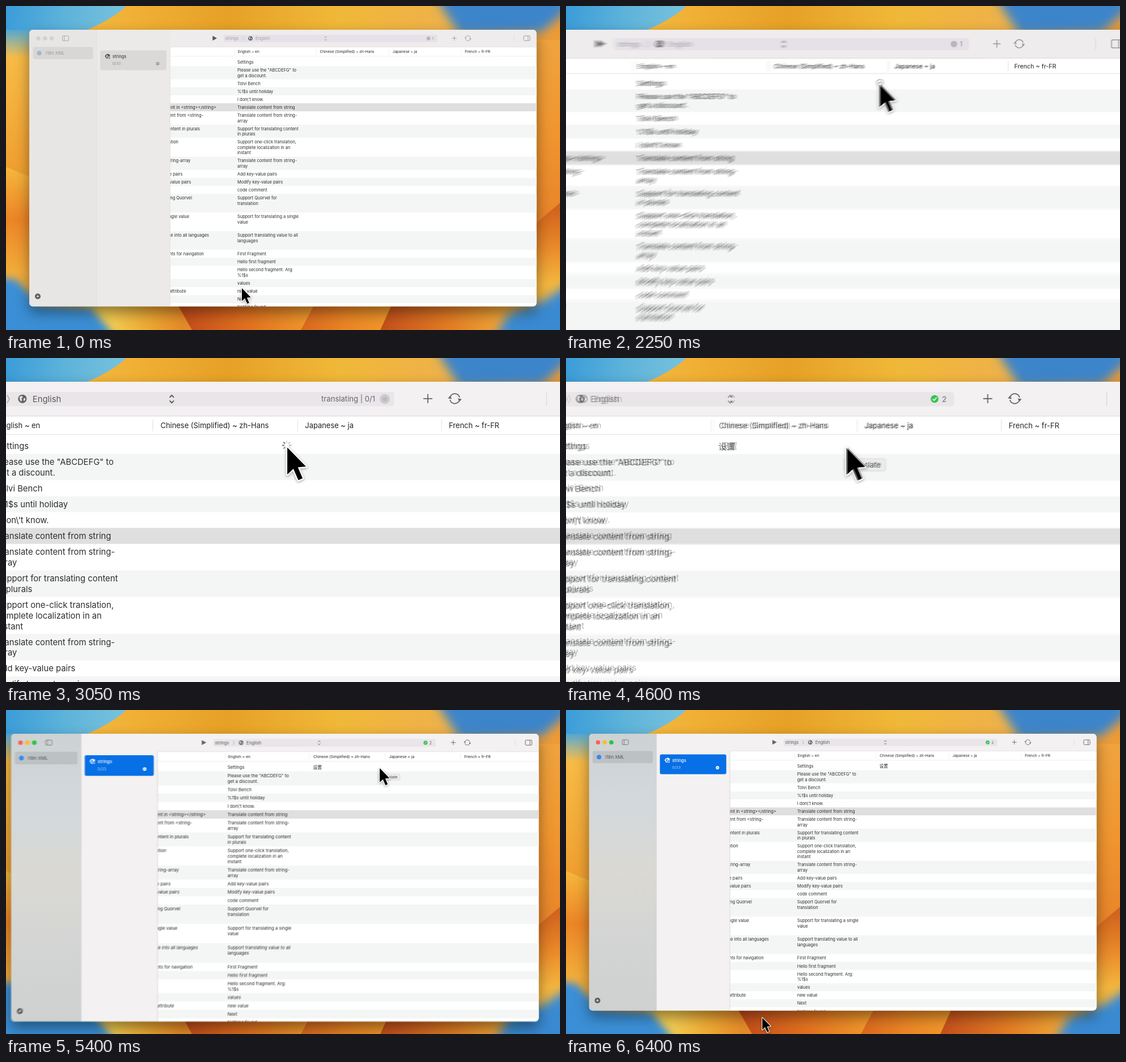
Recreate the animation shown at these times as an HTML page with a canvas. Size 977 px wide and 573 px high, loop 6450 ms.

```html
<!DOCTYPE html>
<html lang="en">
<head>
<meta charset="utf-8">
<title>Translating a string</title>
<style>
  html, body { margin: 0; width: 100%; height: 100%; overflow: hidden; }
  canvas { display: block; width: 977px; height: 573px; }
</style>
</head>
<body>
<canvas id="stage" width="977" height="573"></canvas>
<script>
const W = 977, H = 573, LOOP = 6450, STEP = 50;
const FOCUS = 2400, DONE = 3800;
const FONT = 'Inter, "Noto Sans CJK SC", "Noto Sans CJK", sans-serif';
const out = document.getElementById('stage').getContext('2d');

function layer() {
  const c = document.createElement('canvas');
  c.width = W; c.height = H;
  return c.getContext('2d');
}
const wall = layer(), scene = layer();
let g = wall;

// [value, key, right end of key, minimum lines]
const rows = [
  ['Settings'],
  ['Please use the "ABCDEFG" to\nget a discount.'],
  ['Tolvi Bench'],
  ['%1$s until holiday'],
  ["I don\\'t know."],
  ['Translate content from string', 'Translate content in <string></string>', 371],
  ['Translate content from string-\narray', 'Translate content from <string-', 348],
  ['Support for translating content\nin plurals', 'Translate content in plurals', 342],
  ['Support one-click translation,\ncomplete localization in an\ninstant', 'One-click translation', 304],
  ['Translate content from string-\narray', 'Translate string-array', 325.5],
  ['Add key-value pairs', 'Add key-value pairs', 311.5],
  ['Modify key-value pairs', 'Modify key-value pairs', 326.5],
  ['code comment'],
  ['Support Quorvel for\ntranslation', 'Translate using Quorvel', 328, 3],
  ['Support for translating a single\nvalue', 'Translate a single value', 323, 3],
  ['Support translating value to all\nlanguages', 'Translate value into all languages', 358, 3],
  ['First Fragment', 'Fragments for navigation', 349],
  ['Hello first fragment'],
  ['Hello second fragment. Arg:\n%1$s'],
  ['values'],
  ['new value', 'New attribute', 317.5],
  ['Next'],
  ['Nothing found']
];

function fade(x0, y0, x1, y1, ...stops) {
  const f = g.createLinearGradient(x0, y0, x1, y1);
  stops.forEach((c, i) => f.addColorStop(i / (stops.length - 1), c));
  return f;
}
function shape(fill, d, blur) {
  g.filter = blur ? `blur(${blur}px)` : 'none';
  g.fillStyle = fill;
  g.fill(new Path2D(d));
  g.filter = 'none';
}
function line(color, width, d) {
  g.strokeStyle = color;
  g.lineWidth = width;
  g.stroke(new Path2D(d));
}
function box(color, x, y, w, h, r = 0) {
  g.fillStyle = color;
  g.beginPath();
  g.roundRect(x, y, w, h, r);
  g.fill();
}
function disc(color, x, y, r) {
  g.fillStyle = color;
  g.beginPath();
  g.arc(x, y, r, 0, 7);
  g.fill();
}
function ring(color, x, y, r, width, a = 0, b = 6.2832) {
  g.strokeStyle = color;
  g.lineWidth = width;
  g.beginPath();
  g.arc(x, y, r, a, b);
  g.stroke();
}
function text(s, x, y, color = '#2d2d2d', size = 7.45, weight = 400, align = 'left') {
  g.font = `${weight} ${size}px ${FONT}`;
  g.textAlign = align;
  g.fillStyle = color;
  g.fillText(s, x, y + size * .36);
}

function paintWall() {
  g = wall;
  box(fade(0, 0, W, 0, '#f7bd45', '#f2b338', '#e6a126', '#f0b838', '#eeb14a', '#ee9a35'), 0, 0, W, H);
  shape(fade(0, 80, 0, 290, '#f8bc47', '#ef9f30'), 'M0 60H60V310L0 285Z');
  shape(fade(0, 285, 0, 470, '#f6b83c', '#ec8426', '#f2ac3a'), 'M0 285L60 311V540H0Z');
  shape(fade(0, 40, 0, 92, '#4aa5d9', 'rgba(98,178,218,0)'), 'M0 40H100V92H0Z');
  shape(fade(0, 0, 210, 20, '#3b9cd8', '#5db3da', '#79c2dc'), 'M0 0H212Q190 22 143 42H0Z');
  shape('#3c85ca', 'M748-30H1010L982 14L945 46L800 50Z', 9);
  shape(fade(0, 50, 0, 380, '#efa440', '#f0962f', '#e8842a'), 'M930 60H977V348L930 388Z');
  shape(fade(0, 360, 0, 490, '#d1641f', '#e98829', '#f4b63f'), 'M930 388L977 348V573H930Z');
  shape(fade(190, 0, 310, 0, '#f3ca50', '#eda934', '#e48a29'), 'M140 520H302L330 573H140Z');
  shape(fade(305, 0, 540, 0, '#c04a1a', '#e0701f', '#f09a2c'), 'M298 520L328 573H520L548 520Z');
  shape(fade(520, 0, 680, 0, '#d9681f', '#ea8525', '#f09a2a'), 'M548 520L520 573H660L684 520Z');
  shape(fade(665, 0, 900, 0, '#c4501b', '#e27d25', '#f3b03b'), 'M684 520L660 573H930V520Z');
  shape('#3b8fd6', 'M-30 478L18 484L60 528L150 534L205 600H-30Z', 7);
  shape('#3a8ad2', 'M1010 480L950 520L885 545L850 610H1010Z', 9);
}

// Remaining part of an overdamped spring
function rest(ms) {
  if (ms <= 0) return 1;
  const a = 4.19, b = 25, t = ms / 1000;
  return (b * Math.exp(-a * t) - a * Math.exp(-b * t)) / (b - a);
}
const zoomAt = t => t < 4590 ? 2 - rest(t - 1953) : 1 + rest(t - 4590);

// time, x, y, size
const path = [
  [820, 416, 499, .95], [1520, 661, 93, 1], [1700, 661, 96, 1],
  [2050, 666, 100.5, 1], [5430, 666, 100.5, 1], [6350, 346.5, 544, .88]
];
function cursorAt(t) {
  const i = path.findIndex(p => p[0] > t);
  if (i === 0) return path[0].slice(1);
  if (i < 0) return path[path.length - 1].slice(1);
  const a = path[i - 1], b = path[i];
  const u = (t - a[0]) / (b[0] - a[0]), e = u * u * (3 - 2 * u);
  return [1, 2, 3].map(k => a[k] + (b[k] - a[k]) * e);
}

function globe(x, y, color, land) {
  disc(color, x, y, 3.8);
  shape(land, `M${x - 2.6} ${y - 1.8}l2-1l1.2 1l-1.4 1.4l.6 1.4l-1 1.6l-1.2-2ZM${x + 1} ${y - .4}l1.8-.4l-.4 2l-1.4 1Z`);
}
function plus(x, y, r, color, width) {
  line(color, width, `M${x - r} ${y}h${2 * r}M${x} ${y - r}v${2 * r}`);
}
function panel(x, color, split) {
  g.strokeStyle = color;
  g.lineWidth = .9;
  g.beginPath();
  g.roundRect(x - 5.5, 52.8, 11, 8.6, 1.5);
  g.stroke();
  line(color, .9, `M${x + split} 53v8`);
}
function spinner(x, y, t) {
  for (let i = 0; i < 8; i++) {
    const a = i * Math.PI / 4, c = Math.cos(a), s = Math.sin(a);
    const k = (i - Math.floor(t / 100) % 8 + 8) % 8;
    line(`rgba(70,70,70,${.25 + k * .08})`, .9, `M${x + c * 2} ${y + s * 2}L${x + c * 4.2} ${y + s * 4.2}`);
  }
}

function table(t) {
  box('#fff', 289, 72.5, 650, 462);
  let y = 92;
  rows.forEach(([value, key, end, min = 1], i) => {
    const lines = value.split('\n');
    const h = 4.7 + 9.43 * Math.max(lines.length, min);
    if (i % 2) box(i === 5 ? '#dfdfdf' : '#f4f6f5', 289, y, 650, h);
    lines.forEach((s, n) => text(s, 408, y + 7.2 + n * 9.5));
    if (key) text(key, end, y + 7.2, '#2d2d2d', 7.45, 400, 'right');
    y += h;
  });
  line('#e6e6e6', .6, 'M289 88.8H936M404 75.5v10.5M546.7 75.5v10.5M675.2 75.5v10.5M802.8 75.5v10.5');
  ['English ~ en', 'Chinese (Simplified) ~ zh-Hans', 'Japanese ~ ja', 'French ~ fr-FR']
    .forEach((s, i) => text(s, [409, 553.5, 681.7, 809.3][i], 81, '#222', 6.5));
  if (t >= DONE) text('设置', 553, 99.3, '#222', 7.5);
}

function toolbar(t, on) {
  const ink = on ? '#5c5c5c' : '#a3a1a3';
  box(on ? '#f3f1f2' : '#eeecec', 160, 42, 777, 30.5);
  line('#dedcdd', .6, 'M289 72.5H936');
  shape(on ? '#666' : '#565656', 'M364.3 52.8L372 57L364.3 61.2Z');
  box(on ? '#e9e5e9' : '#e6e1e8', 384, 51, 376.7, 12.8, 2.5);
  text('strings', 386.6, 57.4, ink);
  line(on ? '#aaa' : '#c5c2c6', .8, 'M417.5 54l2 3.4l-2 3.4');
  globe(431, 57.2, on ? '#606060' : '#555', '#ddd');
  text('English', 440, 57.4, ink);
  line(on ? '#555' : '#8b898c', .9, 'M561.6 56l1.9-2l1.9 2M561.6 58.8l1.9 2l1.9-2');
  if (t >= DONE) {
    disc('#32c24d', 743.7, 57.3, 3.4);
    line('#fff', .8, 'M742.1 57.3l1.2 1.3l2.1-2.7');
    text('2', 750.2, 57.4, '#666', 6.7);
  } else if (on) {
    text('translating | 0/1', 744, 57.3, '#666', 6.6, 400, 'right');
    disc('#cdc9ce', 752.5, 57.3, 4.4);
    disc('#bdb9be', 752.5, 57.3, 2);
  } else {
    disc('#b9b5bb', 745, 57.3, 3.4);
    text('1', 751.3, 57.4, '#8b898c', 6.7);
  }
  const tool = on ? '#666' : '#999';
  plus(790.7, 57, 4, tool, .9);
  ring(tool, 814.6, 57, 4.4, .9, .25, 2.9);
  ring(tool, 814.6, 57, 4.4, .9, 3.4, 6.05);
  shape(tool, 'M808.5 56.8l1.9-2.4l1.6 2.8ZM820.7 57.3l-1.9 2.4l-1.6-2.8Z');
  line('#e0dedf', .8, 'M896 51v12.5');
  panel(918.5, tool, 2.2);
}

function sidebars(on) {
  box(on ? fade(0, 42, 0, 531, '#cdd2d3', '#d2d8dc', '#dad9d3', '#d3d4d4', '#cfd0d0') : '#e8e6e5', 41, 42, 119, 490);
  box(on ? '#f3f1f1' : '#ebeae9', 160, 42, 129.5, 490);
  line(on ? '#d0cfcf' : '#e0dedd', .7, 'M159.8 42V532M289.4 72.5V532');
  const lights = on ? ['#fd5f57', '#fdbb2e', '#2ac53f'] : Array(3).fill('#d4d1d0');
  lights.forEach((c, i) => disc(c, 57 + i * 11.75, 57.2, 3.8));
  panel(105, on ? '#737373' : '#a5a3a2', -2.2);
  box(on ? '#bec1c3' : '#d9d7d6', 47.5, 72.5, 106, 21.5, 3);
  disc(on ? '#2f8cf0' : '#9ab9cc', 58.7, 83.3, 4);
  text('I18n XML', 69.8, 83.3, on ? '#505254' : '#9b9998', 7.8);
  box(on ? '#0770e6' : '#dad9d8', 166, 78.5, 117, 35, 3);
  const fore = on ? '#fff' : '#4a4a4a', back = on ? '#0770e6' : '#dad9d8';
  globe(179.3, 89.3, fore, back);
  line(fore, 1, 'M175 90a4.6 4.6 0 0 1 8.6-2.5');
  box(back, 179.5, 90, 5, 4, 1);
  line(fore, .8, 'M180.5 92h3M182 90.5v3');
  text('strings', 187.7, 89.2, on ? '#fff' : '#444', 7.5, 500);
  text('0/33', 187.7, 102, on ? '#b8d6fa' : '#8c8b8a', 6.6);
  disc(on ? '#fff' : '#9c9b9a', 267.5, 102, 3);
  line(back, .9, 'M266 102h3');
  disc('#5d5d5d', 56, 513.5, 5);
  plus(56, 513.5, 2.4, '#f0f0f0', 1);
}

function pointer(x, y, k) {
  g.save();
  g.translate(x, y);
  g.scale(k, k);
  const arrow = new Path2D('M0 0V24L5.4 19L9.8 29L13.6 27.4L9.4 17.6L16.6 17Z');
  g.lineJoin = 'round';
  g.shadowColor = 'rgba(0,0,0,.35)';
  g.shadowBlur = 4;
  g.shadowOffsetY = 1.5;
  g.strokeStyle = '#fff';
  g.lineWidth = 2.4;
  g.stroke(arrow);
  g.shadowColor = 'transparent';
  g.fillStyle = '#000';
  g.fill(arrow);
  g.restore();
}

function tooltip(t) {
  const a = Math.min(1, (t - 4150) / 200, (5700 - t) / 200);
  if (a <= 0) return;
  g.globalAlpha = a;
  box('#d2d2d2', 663, 110, 37.7, 11.4, 2.2);
  box('#ebebea', 663.4, 110.4, 36.9, 10.6, 2);
  text('Translate', 696.2, 115.7, '#444', 6.5, 400, 'right');
  g.globalAlpha = 1;
}

// `t` drives the motion, `now` the state
function paint(t, now) {
  g = scene;
  const z = zoomAt(t), on = now >= FOCUS;
  g.setTransform(1, 0, 0, 1, 0, 0);
  g.drawImage(wall.canvas, 0, 0);
  g.translate(838, 42);
  g.scale(z, z);
  g.translate(-838, -42);
  g.save();
  g.shadowColor = 'rgba(0,0,0,.42)';
  g.shadowBlur = 24;
  g.shadowOffsetY = 11;
  box('#eee', 41.3, 42, 894.2, 489.2, 6);
  g.restore();
  g.save();
  g.beginPath();
  g.roundRect(41.3, 42, 894.2, 489.2, 6);
  g.clip();
  table(now);
  toolbar(now, on);
  sidebars(on);
  if (on && now < DONE) {
    spinner(665.5, 98.6, now);
  } else if (!on && now >= 1500) {
    ring('#9a9a9a', 666, 98.6, 3.5, .7);
    disc('#9a9a9a', 666, 98.6, 1.1);
  }
  tooltip(now);
  g.restore();
  pointer(...cursorAt(t));
}

function render(t) {
  const shutter = 20;
  const p = cursorAt(t), q = cursorAt(t - shutter);
  const travel = Math.abs(zoomAt(t) - zoomAt(t - shutter)) * 600 + Math.hypot(p[0] - q[0], p[1] - q[1]);
  const n = Math.max(1, Math.min(10, Math.ceil(travel)));
  for (let i = 0; i < n; i++) {
    paint(n > 1 ? t + shutter * (i / (n - 1) - .5) : t, t);
    out.globalAlpha = 1 / (i + 1);
    out.drawImage(scene.canvas, 0, 0);
  }
}

let last = -1;
function tick() {
  const t = Math.floor(performance.now() % LOOP / STEP) * STEP;
  if (t !== last) render(last = t);
  requestAnimationFrame(tick);
}
paintWall();
tick();
</script>
</body>
</html>
```
